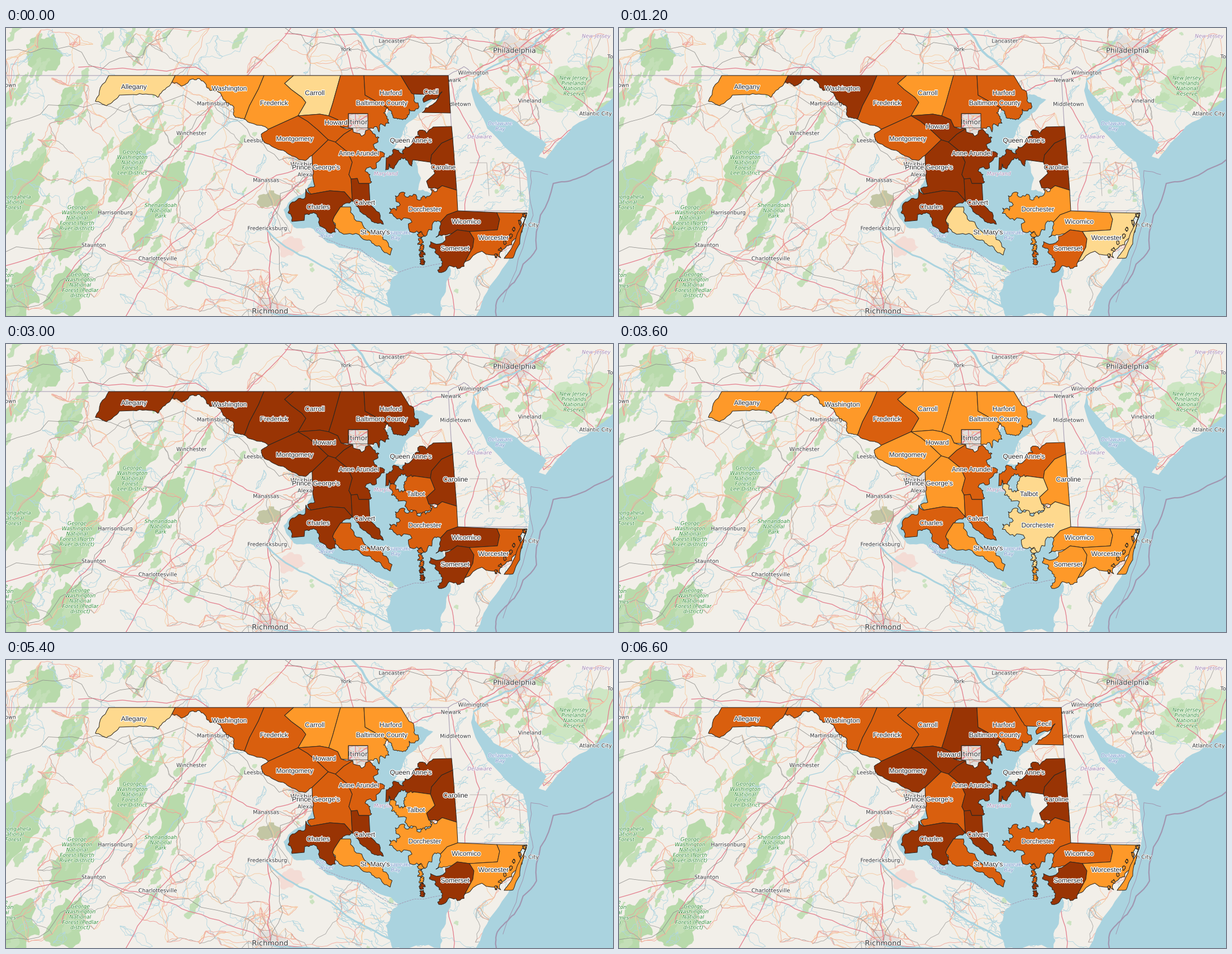
Animation, 1087 px wide and 515 px high, one loop 7200 ms. Source, as a matplotlib script:

```python
import numpy as np
import matplotlib.pyplot as plt
from matplotlib.animation import FuncAnimation
from matplotlib.collections import LineCollection
from matplotlib.patches import Polygon
from matplotlib.patheffects import withStroke

W, H, DPI = 1087, 515, 64
PX = 72 / DPI
STEPS = 12
SHADES = ["#ffffd4", "#fed98e", "#fe9929", "#d95f0e", "#993404"]
rng = np.random.default_rng(24)

fig = plt.figure(figsize=(W / DPI, H / DPI), dpi=DPI)
fig.patch.set_facecolor("#f2efe9")
ax = fig.add_axes([0, 0, 1, 1])
ax.set_xlim(0, W)
ax.set_ylim(H, 0)
ax.axis("off")


def rough(flat, k=0.2, depth=3):
    """Split every segment and push the midpoints sideways."""
    p = np.reshape(flat, (-1, 2)).astype(float)
    for _ in range(depth):
        d = np.diff(p, axis=0)
        out = np.empty((2 * len(p) - 1, 2))
        out[::2] = p
        out[1::2] = (p[:-1] + p[1:]) / 2 + d[:, ::-1] * [-1, 1] * rng.uniform(-k, k, (len(d), 1))
        p = out
    return p


def ring(x, y, rx, ry, angle=0.0, k=0.3, n=9):
    t = np.linspace(0, 2 * np.pi, n + 1)
    r = rng.uniform(0.65, 1.2, n + 1)
    r[-1] = r[0]
    u, v = rx * r * np.cos(t), ry * r * np.sin(t)
    c, s = np.cos(angle), np.sin(angle)
    return rough(np.column_stack([x + c * u - s * v, y + s * u + c * v]), k, 2)


def area(xy, color, z, edge="none", lw=0.0):
    return ax.add_patch(Polygon(xy, closed=True, fc=color, ec=edge, lw=lw * PX,
                                joinstyle="round", zorder=z))


def line(*flat, color="#e4808f", lw=1.3, k=0.07, z=5, style="-"):
    ax.plot(*rough(flat, k).T, color=color, lw=lw * PX, ls=style, zorder=z)


def text(s, x, y, size, color, halo, z, **kw):
    return ax.text(x, y, s, fontsize=size * PX, color=color, ha="center", zorder=z,
                   path_effects=[withStroke(linewidth=halo * PX, foreground="white")], **kw)


# ---- place names of the base map
SIZES = {"Philadelphia": 12.6, "Richmond": 13, "Washington": 11.5, "Baltimore": 12}
PLACES = [("Philadelphia", 911, 40), ("Richmond", 473, 506), ("Washington", 543, 244), ("Baltimore", 626, 168),
          ("York", 609, 38), ("Lancaster", 691, 23), ("Wilmington", 837, 80), ("Newark", 797, 93),
          ("Middletown", 805, 136), ("Vineland", 938, 130), ("Atlantic City", 1056, 153),
          ("Annapolis", 656, 228), ("Alexandria", 548, 262), ("Manassas", 466, 272), ("Leesburg", 448, 201),
          ("Martinsburg", 371, 135), ("Winchester", 332, 188), ("Fredericksburg", 468, 358),
          ("Harrisonburg", 196, 330), ("Staunton", 157, 388), ("Charlottesville", 272, 412),
          ("Ocean City", 928, 352), ("own", 8, 102), ("To", 1082, 51)]
TOWN = {name: (x, y) for name, x, y in PLACES}
for name, (x, y) in TOWN.items():
    size = SIZES.get(name, 9.6)
    text(name, x, y + size * 0.35, size, "#333333", 1.6, 8, family="DejaVu Sans")

FOREST = "George\nWashington\nNational\n"
NOTES = {"#2f8a35": [(FOREST + "Forest –\nLee District", 226, 241),
                     (FOREST + "Forest (North\nRiver district)", 127, 340),
                     (FOREST + "Forest (Pedlar\ndistrict)", 133, 460),
                     (FOREST + "Forest (James\ndistrict)", -14, 452),
                     ("Shenandoah\nNational\nPark", 277, 327), ("Monongahela\nNational\nForest", 13, 312),
                     ("New Jersey\nPinelands\nNational\nReserve", 1017, 104)],
         "#a083b0": [("New Jersey", 1057, 15), ("Delaware", 848, 195), ("Maryland", 680, 261)],
         "#6f8fc6": [("Delaware\nBay", 885, 176), ("Potomac\nRiver", 575, 367), ("Chesapeake\nBay", 698, 371)]}
for color, notes in NOTES.items():
    for note, x, y in notes:
        text(note, x, y, 9.3, color, 1.3, 8, style="italic", va="center", linespacing=1.06, family="DejaVu Sans")

# ---- built-up areas, then woodland on ridges that all run the same way
for name, size in SIZES.items():
    area(ring(*TOWN[name], size * 3, size * 2), "#e2dfdc", 1)
RIDGE = np.radians(-60)
for x, y, length, width in [(228, 232, 80, 28), (120, 360, 75, 30), (280, 310, 105, 15), (24, 300, 95, 42),
                            (110, 470, 58, 32), (18, 485, 55, 35), (112, 140, 40, 20), (70, 40, 34, 34)]:
    area(ring(x, y, length, width, RIDGE, n=14), "#b8daab", 2)
for _ in range(75):
    length = rng.uniform(6, 28)
    area(ring(430 * rng.uniform() ** 1.5, rng.uniform(0, H), length, length / 3.5, RIDGE), "#c3dfb7", 2)
for _ in range(60):
    r = rng.uniform(2, 6)
    area(ring(rng.uniform(430, W), rng.uniform(0, H), r, r), "#cbe3c0", 2)
area(ring(1025, 98, 80, 42, -0.2, n=16), "#cde6c3", 2)
for x in range(860, W, 16):
    area(ring(x, 100 + rng.normal(0, 28), 15, 8, -0.5), "#c0dfb4", 2)
area(ring(475, 307, 28, 16), "#c3c6a4", 2)
area(ring(508, 392, 24, 17), "#f4dcd5", 2)


# ---- streams and small roads: every node joins its nearest neighbours
def network(nodes, links, k, colors, lw, z):
    paths = []
    for p in nodes:
        near = np.argsort(np.hypot(*(nodes - p).T))[1:links + 1]
        paths += [rough([*p, *nodes[j]], k) for j in near]
    ax.add_collection(LineCollection(paths, colors=rng.choice(colors, len(paths)),
                                     linewidths=lw * PX, zorder=z))


ROADS = ["#f4b398", "#f7d0a6", "#ee9d98", "#f6c9a0", "#f2aca0", "#aaa8a5"]
network(rng.uniform(0, (W, H), (330, 2)), 2, 0.28, ["#b0d6e1"], 0.8, 3)
network(rng.uniform(0, (W, H), (380, 2)), 3, 0.14, ROADS, 0.9, 4)
for name, size in SIZES.items():
    network(rng.normal(TOWN[name], size * 2.2, (70, 2)), 3, 0.12, ROADS, 0.9, 4)


# ---- trunk routes run from town to town, or to a point on the edge
def route(*stops, **style):
    line(*np.ravel([TOWN.get(s, s) if isinstance(s, str) else s for s in stops]), **style)


route((100, 470), "Staunton", "Harrisonburg", (270, 252), "Winchester", "Martinsburg", (402, 104), (510, 0))
route("Richmond", (472, 440), "Fredericksburg", (492, 308), "Alexandria", (575, 235), "Baltimore", (700, 125),
      "Newark", "Wilmington", "Philadelphia", (985, 0), lw=1.6)
route((0, 425), "Staunton", (260, 420), (350, 455), "Richmond", (560, 515))
route("Washington", "Manassas", (400, 242), (320, 220))
route("Baltimore", (540, 165), (440, 145), (395, 98), (340, 70), (130, 70))
route("Baltimore", "York", (588, 0))
route((500, 10), (640, 12), (800, 18), "Philadelphia", (1000, 0))
route("Wilmington", (900, 66), (990, 0))
route("Philadelphia", (1000, 110), "Atlantic City", (1087, 70))
route("Atlantic City", (963, 225), "Vineland", "Philadelphia")
route("Newark", "Middletown", (848, 230), (820, 345), (792, 440), (802, 515))
route("Manassas", (350, 350), "Charlottesville", (215, 515))
GREY = dict(color="#8f8e8b", lw=0.8, k=0.18)
route((0, 40), (170, 75), (300, 0), **GREY)
route((0, 175), (160, 135), "Martinsburg", "Leesburg", "Washington", **GREY)
route((0, 400), "Staunton", "Charlottesville", "Richmond", "Fredericksburg", "Alexandria", **GREY)
route("Martinsburg", (270, 255), "Harrisonburg", (130, 430), (0, 500), **GREY)
route((500, 0), "York", "Lancaster", "Philadelphia", **GREY)

# ---- water; whatever the counties always cover needs no detail
WATER = "#aad3df"
area(rough([735, 118, 765, 128, 722, 168, 695, 215, 735, 205, 738, 290, 770, 300, 785, 380, 797, 434, 788, 465,
            778, 515, 692, 515, 680, 475, 703, 437, 640, 402, 560, 368, 515, 356, 497, 325, 540, 286, 553, 250,
            590, 320, 640, 300, 660, 180, 700, 140], 0.14), WATER, 6)
area(rough([1100, 110, 1015, 176, 966, 234, 954, 230, 968, 208, 915, 168, 873, 148, 840, 108, 838, 90, 833, 112,
            862, 180, 926, 240, 937, 300, 934, 335, 908, 400, 866, 462, 830, 540, 1100, 540], 0.05), WATER, 6)
RIVER = dict(color=WATER, z=6)
line(838, 92, 915, 50, 975, 0, lw=3, **RIVER)
line(620, 0, 690, 75, 728, 118, lw=4, **RIVER)
line(468, 362, 565, 425, 690, 500, lw=3, **RIVER)
line(470, 508, 560, 515, lw=3, **RIVER)
line(425, 165, 300, 290, 200, 400, lw=1.3, k=0.2, **RIVER)
for _ in range(45):
    x, y = rng.uniform((580, 400), (690, 515))
    line(x, y, x + 22, y + 14, lw=1, k=0.3, **RIVER)
    x, y = rng.uniform((795, 180), (930, 330))
    line(x, y, x + 16, y - 8, lw=0.8, k=0.3, **RIVER)

# ---- boundaries
BORDER = dict(color="#a196b0", z=7)
line(0, 85, 792, 85, 796, 152, 807, 327, 934, 327, lw=1, k=0, **BORDER)
line(792, 85, 820, 69, 840, 84, lw=1, **BORDER)
line(1087, 236, 1020, 270, 980, 278, 950, 395, 910, 455, 880, 486, 878, 515, lw=2.2, **BORDER)
line(970, 262, 940, 255, 944, 335, 890, 490, lw=1, **BORDER)
line(560, 372, 700, 438, 830, 416, lw=0.9, style="--", **BORDER)
for x in (831, 888):
    line(x, 241, x + 30, 241, x + 34, 300, lw=0.8, k=0, color="#a9a6a4")

# ---- counties: shade at each survey step ("-" = no value), label place, corners, coast roughness
SURVEYS = [0, 2, 4, 5, 7, 9, 11]
LABEL_MOVES = {"Howard": ("Cecil", 591, 169), "Caroline": ("Talbot", 805, 242)}
counties = {}


def county(name, shades, x, y, corners, k=0.3):
    known = [s for s in zip(SURVEYS, shades) if s[1] != "-"]
    steps = [s for s, _ in known]
    shown = range(steps[0], steps[-1] + 1) if len(known) > 2 else steps
    values = np.interp(range(STEPS), steps, [int(v) for _, v in known])
    corners = [tuple(c) for c in np.reshape(corners, (-1, 2))]
    counties[name] = dict(
        shown=shown, shade=values.astype(int), spot=(x, y), k=k, parts=[],
        edges=list(zip(corners, corners[1:] + corners[:1])),
        label=text(name, x, y + 4, 12, "#262626", 2.6, 12, family="Liberation Sans"))


county("Allegany", "1234013", 229, 105,
       [184, 85, 303, 85, 297, 97, 280, 113, 272, 124, 228, 119, 203, 120, 180, 139, 160, 131], 0.12)
county("Washington", "2434133", 400, 108,
       [303, 85, 462, 85, 452, 109, 436, 139, 427, 163, 411, 160, 408, 141, 394, 133, 385, 118, 366, 112,
        355, 97, 335, 91, 314, 104, 297, 97], 0.2)
county("Frederick", "2344233", 480, 134,
       [462, 85, 515, 85, 499, 99, 511, 110, 530, 124, 537, 133, 523, 157, 470, 181, 453, 174, 427, 163,
        436, 139, 452, 109], 0.1)
county("Carroll", "1234123", 553, 116,
       [515, 85, 599, 85, 585, 135, 578, 157, 562, 154, 523, 157, 537, 133, 530, 124, 511, 110, 499, 99])
county("Baltimore County", "3324124", 673, 134,
       [599, 85, 641, 85, 643, 120, 684, 143, 682, 162, 686, 170, 668, 186, 648, 180, 648, 153, 613, 153,
        613, 178, 600, 177, 594, 164, 578, 157, 585, 135], 0.4)
county("Harford", "3314123", 689, 116,
       [641, 85, 707, 85, 722, 110, 738, 134, 722, 145, 718, 160, 705, 163, 692, 156, 684, 143, 643, 120], 0.35)
county("Cecil", "4-----3", 761, 114,
       [707, 85, 792, 85, 796, 152, 745, 151, 760, 139, 781, 114, 748, 133, 752, 119, 729, 118, 722, 110], 0.2)
county("Howard", "3424134", 570, 176,
       [523, 157, 562, 154, 578, 157, 594, 164, 600, 177, 621, 180, 605, 190, 590, 204, 577, 200, 558, 182,
        540, 167], 0.1)
county("Montgomery", "3334134", 517, 198,
       [523, 157, 540, 167, 558, 182, 577, 200, 548, 228, 536, 237, 512, 229, 497, 219, 463, 205, 457, 190,
        470, 181], 0.1)
county("Prince George's", "3424133", 555, 249,
       [548, 228, 577, 200, 590, 204, 612, 222, 620, 240, 614, 262, 618, 270, 620, 309, 606, 293, 580, 291,
        546, 297, 540, 287, 553, 283, 549, 252], 0.12)
county("Anne Arundel", "3424234", 632, 224,
       [590, 204, 605, 190, 621, 180, 656, 186, 668, 196, 660, 215, 670, 236, 648, 250, 652, 262, 650, 278,
        632, 278, 629, 269, 618, 270, 614, 262, 620, 240, 612, 222], 0.45)
county("Calvert", "4434344", 642, 312,
       [618, 270, 629, 269, 632, 278, 650, 278, 652, 315, 676, 351, 655, 346, 640, 333, 620, 309], 0.15)
county("Charles", "4424244", 559, 320,
       [546, 297, 580, 291, 606, 293, 620, 309, 599, 320, 588, 337, 585, 344, 590, 365, 562, 354, 550, 330,
        535, 333, 534, 344, 512, 346, 505, 330, 513, 311, 536, 303, 537, 288], 0.2)
county("St. Mary's", "2113123", 661, 365,
       [599, 320, 617, 320, 637, 347, 672, 367, 688, 406, 664, 390, 640, 378, 600, 366, 585, 344, 588, 337], 0.25)
county("Queen Anne's", "4414244", 725, 201,
       [798, 176, 800, 197, 780, 206, 762, 227, 760, 240, 731, 236, 727, 247, 708, 232, 694, 252, 686, 243,
        680, 254, 681, 232, 692, 219, 712, 225, 727, 208, 741, 194, 737, 186, 765, 177])
county("Caroline", "4414144", 783, 249,
       [800, 197, 807, 290, 781, 282, 773, 288, 757, 286, 753, 274, 768, 260, 760, 240, 762, 227, 780, 206], 0.15)
county("Talbot", "---302-", 734, 268,
       [731, 236, 760, 240, 768, 260, 753, 274, 757, 286, 762, 296, 745, 303, 730, 298, 713, 280, 702, 281,
        690, 270, 687, 256, 704, 264, 716, 262, 714, 246], 0.45)
county("Dorchester", "3213023", 750, 324,
       [773, 288, 781, 282, 807, 290, 809, 327, 790, 334, 778, 347, 768, 345, 750, 373, 730, 366, 708, 344,
        687, 322, 706, 316, 697, 300, 716, 302, 740, 308, 757, 301], 0.4)
county("Wicomico", "4214023", 824, 346,
       [809, 327, 879, 330, 884, 342, 880, 361, 830, 364, 808, 361, 798, 368, 770, 374, 778, 347, 790, 334], 0.2)
county("Somerset", "4324144", 804, 394,
       [798, 368, 808, 361, 830, 364, 838, 377, 836, 392, 822, 418, 798, 426, 773, 433, 779, 412, 764, 394,
        760, 382], 0.35)
county("Worcester", "3113122", 873, 375,
       [879, 330, 933, 331, 922, 358, 910, 378, 895, 392, 886, 411, 822, 418, 836, 392, 838, 377, 830, 364,
        880, 361, 884, 342], 0.25)

all_edges = [frozenset(e) for c in counties.values() for e in c["edges"]]


def outline(c):
    """Common borders and surveyed lines stay straight; open edges become shore."""
    pieces = []
    for a, b in c["edges"]:
        dx, dy = abs(a[0] - b[0]), abs(a[1] - b[1])
        straight = all_edges.count(frozenset((a, b))) > 1 or min(dx, dy) < 0.1 * max(dx, dy)
        pieces.append(rough([a, b], 0 if straight else c["k"])[:-1])
    return np.vstack(pieces)


def add_part(c, xy):
    c["parts"].append(area(xy, "w", 10, "#2b2620", 1.0))


for c in counties.values():
    add_part(c, outline(c))
add_part(counties["Worcester"], rough([933, 331, 920, 386, 908, 411, 892, 412, 912, 380, 933, 331], 0.06))
for i, y in enumerate(range(370, 424, 12)):
    add_part(counties["Somerset" if i > 2 else "Dorchester"], ring(742 + i, y, 4, 6, k=0.7))
for y in range(336, 410, 12):
    add_part(counties["Worcester"], ring(1095 - y / 2 + rng.normal(0, 3) - (y - 336) / 5, y, 2.5, 4, k=0.6))
area([(613, 153), (648, 153), (648, 178), (613, 178)], "none", 9, "#55504a", 0.8)


def update(step):
    for name, c in counties.items():
        visible = step in c["shown"]
        for part in c["parts"]:
            part.set_visible(visible)
            part.set_facecolor(SHADES[c["shade"][step]])
        c["label"].set_visible(visible)
        x, y = c["spot"]
        if name in LABEL_MOVES:
            neighbour, new_x, new_y = LABEL_MOVES[name]
            if step in counties[neighbour]["shown"]:
                x, y = new_x, new_y
        c["label"].set_position((x, y + 4))
    return []


anim = FuncAnimation(fig, update, frames=STEPS, interval=600, repeat=True)
plt.show()
```
